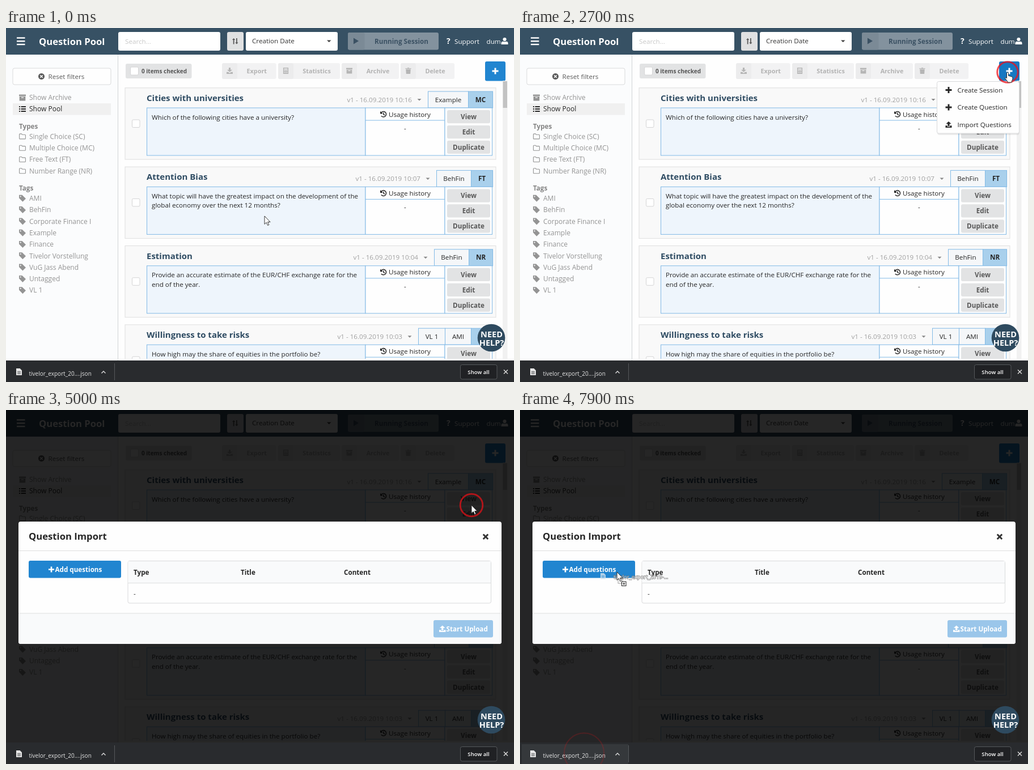
Animation of 896x625 px, one loop 8000 ms. Source, as an HTML page:

```html
<!DOCTYPE html>
<html lang="en">
<head>
<meta charset="utf-8">
<title>Question Pool</title>
<style>
html, body { margin: 0; width: 100%; height: 100%; overflow: hidden; background: #fefefe; }
svg { display: block; width: 100%; height: 100%; font-family: "Open Sans", "Noto Sans", sans-serif; }
text { white-space: pre; }
</style>
</head>
<body>
<svg id="stage" viewBox="0 0 896 625"></svg>
<script>
const NAVY = '#375164', BLUE = '#2185d0', LINE = '#82bae6', GREY = '#949494', INK = '#262626';
const BASE = 11.66;

// Icons are drawn in a 12 x 12 box.
const ICONS = {
  plus: 'M4.4 0h3.2v4.4H12v3.2H7.6V12H4.4V7.6H0V4.4h4.4z',
  archive: 'M0 .5h12v2.7H0zM.7 4h10.6v7.5H.7zM4 5.2v1.3h4V5.2z',
  list: 'M0 1h2v2H0zM3.5 1H12v2H3.5zM0 5h2v2H0zM3.5 5H12v2H3.5zM0 9h2v2H0zM3.5 9H12v2H3.5z',
  tag: 'M0 0h5.4L12 6.4 6.4 12 0 5.4zM1.6 2.7a1.1 1.1 0 1 0 2.2 0 1.1 1.1 0 1 0-2.2 0z',
  download: 'M4.3 0h3.4v4H11L6 8.5 1 4h3.3zM0 8.5h3.2L6 10.6 8.8 8.5H12V12H0z',
  upload: 'M6 0l5 4.5H7.7V9H4.3V4.5H1zM0 8h3.3v2h5.4V8H12v4H0z',
  calc: 'M1 0h10v12H1zM2.5 1.5v2.2h7V1.5zM2.5 5v1.8h1.8V5zM5.1 5v1.8h1.8V5zM7.7 5v1.8h1.8V5zM2.5 8.4v1.8h1.8V8.4zM5.1 8.4v1.8h1.8V8.4zM7.7 8.4v1.8h1.8V8.4z',
  trash: 'M.5 1h3.8l.5-1h2.4l.5 1h3.8v1.4H.5zM1.4 3.2h9.2L10 12H2z',
  user: 'M6 0a3.1 3.1 0 1 1 0 6.2A3.1 3.1 0 1 1 6 0zM0 12V9.8q0-3 3.2-3 2.8 1 5.6 0 3.2 0 3.2 3V12z',
  play: 'M1 0l10 6-10 6z',
  reset: 'M6 0a6 6 0 1 0 .01 0zM6 4.8l1.9-1.9 1.2 1.2L7.2 6l1.9 1.9-1.2 1.2L6 7.2 4.1 9.1 2.9 7.9 4.8 6 2.9 4.1l1.2-1.2z',
  close: 'M2.4 0L6 3.6 9.6 0 12 2.4 8.4 6 12 9.6 9.6 12 6 8.4 2.4 12 0 9.6 3.6 6 0 2.4z',
  caret: 'M0 3h12L6 9z',
  file: 'M1 0h6.5L11 3.5V12H1zM3 5v.8h6V5zM3 7v.8h6V7zM3 9v.8h6V9z',
  sort: 'M3 0l3 3.5H4V12H2V3.5H0zM9 12l3-3.5h-2V0H8v8.5H6z',
  folder: 'M.6 2.3q0-1 1-1h2.8l1.3 1.4h4.7q1 0 1 1v5.6q0 1-1 1H1.6q-1 0-1-1z',
  history: 'M1.4 4A5 5 0 1 1 2 9M.8 1v3.4h3.4M6.2 3.2v3.1l2.2 1.3'
};

const rect = (x, y, w, h, fill, extra = '') =>
  `<rect x="${x}" y="${y}" width="${w}" height="${h}" fill="${fill}" ${extra}/>`;
const box = (x, y, w, h, fill, stroke, r = 0) => rect(x, y, w, h, fill, `stroke="${stroke}" rx="${r}"`);
const line = (x1, y1, x2, y2, stroke, w = 1) =>
  `<path d="M${x1} ${y1}L${x2} ${y2}" stroke="${stroke}" stroke-width="${w}"/>`;
const text = (x, y, str, fill = INK, { size = BASE, weight = 400, anchor = 'start', extra = '' } = {}) =>
  `<text x="${x}" y="${y}" fill="${fill}" font-size="${size}" font-weight="${weight}" text-anchor="${anchor}" ${extra}>${str}</text>`;
const bold = (x, y, str, fill, opts) => text(x, y, str, fill, { weight: 700, ...opts });
const mid = { anchor: 'middle' };
const icon = (name, x, y, fill, size = 12) => {
  const paint = name === 'folder' || name === 'history'
    ? `fill="none" stroke="${fill}" stroke-width="${name === 'folder' ? 1.1 : 1.6}"`
    : `fill="${fill}" fill-rule="evenodd"`;
  return `<path d="${ICONS[name]}" transform="translate(${x} ${y}) scale(${size / 12})" ${paint}/>`;
};

function header() {
  return rect(0, 0, 896, 47, NAVY) +
    [17.5, 23.3, 29].map(y => line(19, y, 33.5, y, '#fff', 2.4)).join('') +
    bold(58, 30, 'Question Pool', '#fff', { size: 16.66 }) +
    rect(198, 7, 180, 33, '#fff', 'rx="3"') + text(210, 27.5, 'Search...', '#c8c8c8') +
    rect(390, 7, 29, 33, '#e0e1e2', 'rx="3"') + icon('sort', 399, 18, '#555', 10.5) +
    rect(423, 7, 162, 33, '#fff', 'rx="3"') + text(434, 27, 'Creation Date', '#333') +
    icon('caret', 566, 19.5, '#444', 7.5) +
    rect(603, 8, 160, 30.5, '#83929e', 'rx="3"') + rect(603, 8, 29.5, 30.5, '#7b8a96', 'rx="3"') +
    icon('play', 612, 17.5, '#3b5163', 11) + bold(697.5, 27.5, 'Running Session', '#3b5163', mid) +
    bold(777, 28, '?', '#fff', { size: 14 }) + text(791, 28, 'Support', '#fff') +
    text(847.5, 28, 'dum', '#fff') + icon('user', 873.5, 17, '#fff', 12);
}

function sidebar() {
  const row = (name, y, label, fill = GREY) =>
    icon(name, 23, y - 6, fill) + text(41, y + 4.2, label, fill, { size: 12 });
  const types = ['Single Choice (SC)', 'Multiple Choice (MC)', 'Free Text (FT)', 'Number Range (NR)'];
  const tags = ['AMI', 'BehFin', 'Corporate Finance I', 'Example', 'Finance',
    'Tivelor Vorstellung', 'VuG Jass Abend', 'Untagged', 'VL 1'];
  return rect(0, 47, 197.5, 540, '#fbfcfd') + line(197.5, 47, 197.5, 587, '#d0d3d5') +
    box(12, 71, 173, 29, '#fefefe', '#d9dadb', 3) +
    icon('reset', 57, 80, '#5a5a5a', 11) + text(74.5, 90, 'Reset filters', '#5a5a5a') +
    row('archive', 123, 'Show Archive') + rect(12, 133, 173, 20.5, '#f0f0f0') + row('list', 143, 'Show Pool', INK) +
    bold(23, 177.5, 'Types', '#858585') + types.map((s, i) => row('folder', 191.6 + i * 20.3, s)).join('') +
    bold(23, 286.5, 'Tags', '#858585') + tags.map((s, i) => row('tag', 300.8 + i * 20.3, s)).join('');
}

function toolbar() {
  const action = (x, w, name, label) =>
    rect(x, 62, w, 28, '#f2f2f3', 'rx="3"') + rect(x, 62, 27, 28, '#ececed', 'rx="3"') +
    icon(name, x + 8, 70, '#b5b5b5', 11) +
    bold(x + 27 + (w - 27) / 2, 80, label, '#b3b3b3', { size: 10.83, anchor: 'middle' });
  return rect(211, 63, 116.5, 26, '#e2e3e4', 'rx="3"') + box(219.5, 69, 14, 14, '#fff', '#d4d4d5', 2) +
    bold(239, 80, '0 items checked', '#555', { size: 10 }) +
    action(381, 95.5, 'download', 'Export') + action(480, 109, 'calc', 'Statistics') +
    action(592, 101, 'archive', 'Archive') + action(696, 95, 'trash', 'Delete') +
    rect(845, 59, 36, 34.5, BLUE, 'id="add" rx="3"') + icon('plus', 857.5, 70.5, '#fff', 11);
}

const CARDS = [
  ['Cities with universities', '10:16', [744, 815], ['Example', 'MC'],
    ['Which of the following cities have a university?']],
  ['Attention Bias', '10:07', [759, 820], ['BehFin', 'FT'],
    ['What topic will have the greatest impact on the development of the', 'global economy over the next 12 months?']],
  ['Estimation', '10:04', [755, 816], ['BehFin', 'NR'],
    ['Provide an accurate estimate of the EUR/CHF exchange rate for the', 'end of the year.']],
  ['Willingness to take risks', '10:03', [727, 774, 820], ['VL 1', 'AMI', 'SC'],
    ['How high may the share of equities in the portfolio be?']]
];

function card([title, time, edges, tags, lines], i) {
  const tagBoxes = tags.map((tag, k) => {
    const last = k === tags.length - 1, x = edges[k], w = (edges[k + 1] || 858) - x;
    return box(x + .5, 112, w, 29, last ? '#a9d0ec' : '#f5f7f9', LINE) +
      text(x + w / 2 + .5, 130.5, tag, INK, { anchor: 'middle', weight: last ? 700 : 400 });
  }).join('');
  const buttons = ['View', 'Edit', 'Duplicate'].map((label, k) =>
    rect(778, 145 + k * 26.9, 76, 23.3, '#e2e3e4', 'rx="3"') +
    bold(816, 161 + k * 26.9, label, '#585858', mid)).join('');
  return `<g transform="translate(0 ${i * 139.4})">` +
    box(210, 105.7, 654, 126.3, '#f9f9f9', '#dedede') +
    box(222.5, 162, 13.5, 13.5, '#fff', '#d4d4d5', 2) +
    bold(248, 129, title, '#2f4c63', { size: 15 }) +
    text(edges[0] - 28, 130.5, 'v1 - 16.09.2019 ' + time, '#a0a0a0', { anchor: 'end' }) +
    icon('caret', edges[0] - 18.5, 123.3, '#8a8a8a', 7) + tagBoxes +
    box(248.5, 141, 385.5, 84, '#eef5fc', LINE) +
    box(634, 141, 140, 84, '#fefefe', LINE) + line(634, 163, 774, 163, LINE) +
    box(774, 141, 83.5, 84, '#fefefe', LINE) +
    lines.map((s, k) => text(257, 161.5 + k * 16.6, s)).join('') +
    icon('history', 660, 146.5, INK, 11.5) + text(675, 156.5, 'Usage history') + text(704, 181, '-', INK, mid) +
    buttons + '</g>';
}

function menu() {
  const entry = (y, name, label) => icon(name, 750.5, y - 5.5, INK, 11) + text(771.5, y + 4.2, label);
  return '<g id="menu">' + rect(736, 96, 145, 93, '#000', 'opacity=".07" rx="4"') +
    box(735.5, 94.5, 145, 91.5, '#fefefe', '#d8d9da', 3) + rect(736, 95, 144, 30.5, '#f2f2f2', 'id="hover"') +
    entry(109.5, 'plus', 'Create Session') + entry(140, 'plus', 'Create Question') +
    entry(170.5, 'upload', 'Import Questions') + '</g>';
}

function modal() {
  const columns = [[225, 'Type'], [414, 'Title'], [596, 'Content']];
  return '<g id="modal">' + rect(0, 0, 896, 587, '#000', 'opacity=".85"') +
    rect(22, 197, 852, 216, '#fefefe', 'rx="4"') +
    '<path d="M22 359H874V409a4 4 0 0 1-4 4H26a4 4 0 0 1-4-4z" fill="#f9fafb"/>' +
    line(22, 248.5, 874, 248.5, '#dedfdf') + line(22, 359, 874, 359, '#dedfdf') +
    bold(40, 229, 'Question Import', INK, { size: 16.66 }) + icon('close', 840.7, 218.5, '#333', 10.5) +
    rect(40, 266, 163, 30.5, BLUE, 'rx="3"') + icon('plus', 75, 276.5, '#fff', 10) +
    bold(86.5, 286, 'Add questions', '#fff') +
    box(215, 266.5, 640.5, 74.5, '#fefefe', '#d9dadb', 3) + rect(215.5, 267, 639.5, 38.5, '#f9fafb') +
    line(215, 305.5, 855.5, 305.5, '#dedfdf') +
    columns.map(([x, s]) => bold(x, 290.5, s)).join('') + text(225, 327.5, '-') +
    rect(754, 371, 105, 30.5, '#9ac6ea', 'rx="3"') + icon('upload', 764, 380.5, '#fff', 11.5) +
    bold(776.5, 390.8, 'Start Upload', '#fff') + '</g>';
}

function help() {
  const word = (y, s) => bold(856.5, y, s, '#fff', { size: 14.5, anchor: 'middle', extra: 'style="font-stretch:75%"' });
  return '<circle cx="856" cy="547" r="24.3" fill="#2e4a5f"/>' + word(546, 'NEED') + word(561, 'HELP?');
}

function downloads() {
  return rect(0, 587, 896, 38, '#292b2e') + rect(3, 590, 188, 35, '#35383b', 'id="shelf"') +
    '<circle id="press" cx="113" cy="605" r="16" fill="#55585b"/>' +
    icon('file', 17, 601, '#e6e6e6', 12) + text(40.5, 613.5, 'tivelor_export_20....json', '#e4e4e4', { size: 10 }) +
    '<path d="M168.5 609.5L172 606l3.5 3.5" fill="none" stroke="#ddd" stroke-width="1.4"/>' +
    line(191.5, 592, 191.5, 622, '#55585b') + box(801.5, 594.5, 64.5, 25.5, '#202124', '#55585b', 3) +
    text(833.5, 610.5, 'Show all', '#fff', { size: 9.6, weight: 600, anchor: 'middle' }) +
    '<path d="M878 603.5l7 7m0-7l-7 7" stroke="#ddd" stroke-width="1.4"/>';
}

function pointer() {
  const shape = 'fill="#fff" stroke="#222" stroke-width=".9" stroke-linejoin="round"';
  return '<circle id="ring" fill="none" stroke="#f01018"/><g id="cursor"><g id="drag">' +
    '<g opacity=".75">' + icon('file', -30, 2, '#e4ebf0', 11) +
    text(-6, 12, 'tivelor_export_2019-...', '#fff',
      { size: 9.4, extra: 'stroke="#666" stroke-width="1.3" paint-order="stroke"' }) + '</g>' +
    '<rect x="2" y="12" width="8" height="8" fill="none" stroke="#444" stroke-dasharray="1 1"/>' +
    box(8.5, 17, 7.5, 7.5, '#fff', '#222') + '<path d="M10.2 20.75h4.2M12.3 18.6v4.3" stroke="#222"/></g>' +
    `<path id="arrow" d="M0 0V14.4L3.3 11.3 5.6 16.5 7.8 15.5 5.6 10.5H10Z" ${shape}/>` +
    `<path id="hand" d="M-1.5 1.2Q0-1 1.5 1.2V6.3L7 7.8Q9 8.4 9 10.5 8.8 14 7.3 15.5V18H0V16.5L-4.3 11Q-4.6 9.2-2.8 9.6L-1.5 10.8Z" ${shape}/></g>`;
}

document.getElementById('stage').innerHTML =
  '<clipPath id="view"><path d="M198 47H896V584H198z"/></clipPath>' + rect(0, 0, 896, 625, '#fefefe') +
  sidebar() + toolbar() + '<g clip-path="url(#view)">' + CARDS.map(card).join('') + '</g>' +
  rect(876, 93, 8.5, 491, '#f1f1f1') + rect(876.5, 94, 7.5, 47, '#c3c3c3') + header() +
  menu() + modal() + help() + downloads() + pointer();

const el = Object.fromEntries(['add', 'menu', 'hover', 'modal', 'shelf', 'press', 'ring', 'cursor', 'drag', 'arrow', 'hand']
  .map(id => [id, document.getElementById(id)]));
const show = (node, on) => node.setAttribute('visibility', on ? 'inherit' : 'hidden');
const set = (node, attrs) => { for (const k in attrs) node.setAttribute(k, attrs[k]); };

const easeIn = f => f ** 1.7, easeOut = f => 1 - (1 - f) ** 1.7, linear = f => f;
// Time, x, y and the easing used to reach that point.
const PATH = [
  [200, 456, 332], [1100, 785, 96, easeIn], [1700, 860, 78, easeOut],
  [3100, 860, 78, linear], [3400, 845, 92, easeIn], [3900, 823, 149, linear], [4200, 821, 168, easeOut],
  [5000, 821, 168, linear], [5700, 573, 246, easeIn], [6600, 113, 602, easeOut],
  [6850, 113, 602, linear], [7000, 124, 579, easeIn], [7300, 208, 420, linear],
  [7500, 182, 301, easeOut], [7900, 171, 286, easeOut]
];
const CLICKS = [[2130, 860, 78], [4385, 821, 168], [6830, 113, 605.5]];
const RING_LIFE = 1200;

function cursorAt(t) {
  const i = PATH.findIndex(p => p[0] >= t);
  if (i === 0) return PATH[0].slice(1);
  const [t0, x0, y0] = PATH[i - 1], [t1, x1, y1, ease] = PATH[i];
  const f = ease((t - t0) / (t1 - t0));
  return [x0 + (x1 - x0) * f, y0 + (y1 - y0) * f];
}

function render(t) {
  const [x, y] = cursorAt(t);
  const menuOpen = t >= 2300 && t < 5000, dragging = t >= 7100;
  const onHand = t < 5100 && x >= 845 && y < 94 || menuOpen;

  set(el.cursor, { transform: `translate(${x} ${y})` });
  show(el.hand, onHand);
  show(el.arrow, !onHand);
  show(el.drag, dragging);
  set(el.add, { fill: t > 1200 && x >= 845 || menuOpen ? '#1678c2' : BLUE });

  const entry = Math.floor((y - 94.5) / 30.5);
  show(el.menu, menuOpen);
  show(el.hover, menuOpen && entry >= 0);
  set(el.hover, { y: 95 + Math.max(0, entry) * 30.3 });
  show(el.modal, t >= 5000);
  show(el.shelf, t >= 6500);
  show(el.press, t >= 6800 && t < 7200);

  const click = CLICKS.find(([start]) => t > start && t < start + RING_LIFE);
  show(el.ring, click);
  if (click) {
    const p = (t - click[0]) / RING_LIFE, width = 2.2 + 3 * (1 - p) ** 2;
    set(el.ring, {
      cx: click[1], cy: click[2], r: Math.max(1, 40 * p - width / 4),
      'stroke-width': width, opacity: 1 - p ** 1.8
    });
  }
}

function tick() {
  render(Math.floor(performance.now() % 8000 / 100) * 100);
  requestAnimationFrame(tick);
}
tick();
</script>
</body>
</html>
```
